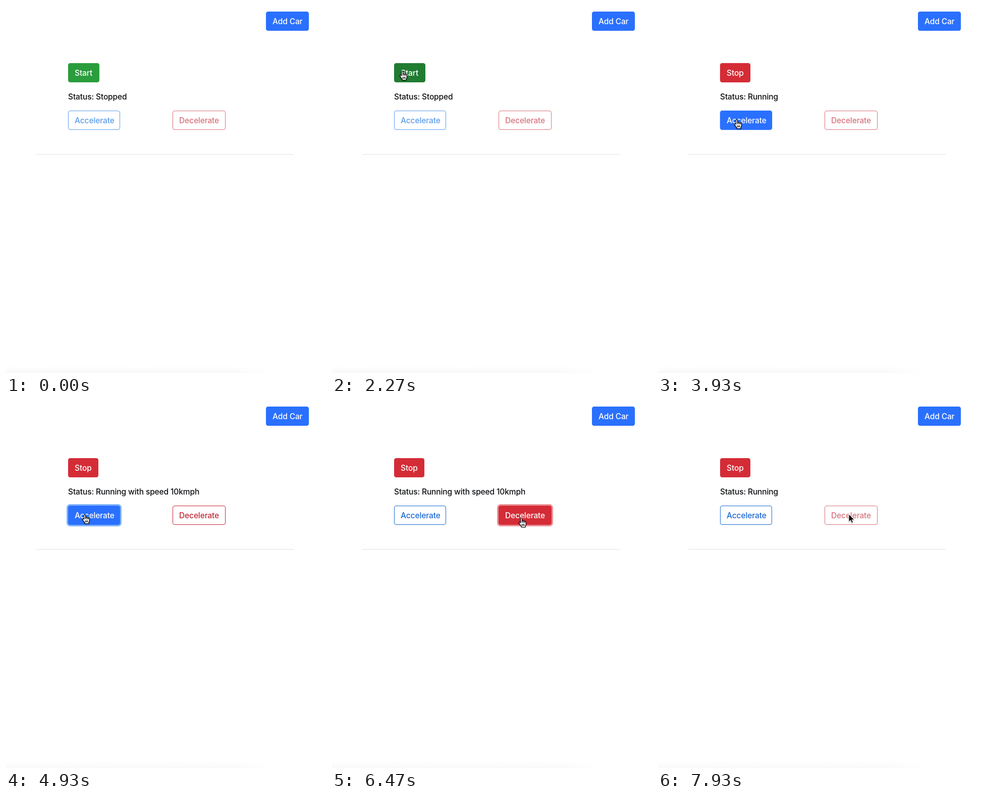
An HTML page for the animation above (8 s loop, 634 by 726 pixels).

```html
<!DOCTYPE html>
<html lang="en">
<head>
<meta charset="utf-8">
<style>
html, body { margin: 0; width: 100%; height: 100%; overflow: hidden; background: #fff; }
body { position: relative; font: 450 15.5px/24px Inter, Roboto, sans-serif; letter-spacing: -.12px; color: #0d0f12; }
body > * { position: absolute; white-space: pre; }
.btn { box-sizing: border-box; height: 38px; padding: 7px 12px 5px; border: 1px solid; border-radius: 4px; }
#add { left: 515px; top: 11px; width: 85px; color: #fff; background: #2a70fe; border-color: #2a70fe; }
#power { left: 123px; top: 113px; }
#status { left: 123px; top: 168px; }
#acc { left: 123px; top: 207px; width: 103px; }
#dec { left: 330px; top: 207px; width: 105px; }
#line { left: 60px; top: 293px; width: 510px; height: 1px; background: #e2e2e2; }
#shade { left: 0; bottom: 0; width: 530px; height: 14px; background: linear-gradient(#fff, #f9f9f9); mask: linear-gradient(90deg, #000 85%, transparent); }
svg { left: 0; top: 0; overflow: visible; filter: drop-shadow(0 1px 1px #0005); }
</style>
</head>
<body>
<div id="add" class="btn">Add Car</div>
<div id="power" class="btn"></div>
<div id="status"></div>
<div id="acc" class="btn">Accelerate</div>
<div id="dec" class="btn">Decelerate</div>
<div id="line"></div>
<div id="shade"></div>
<svg id="cursor" width="20" height="22">
  <path id="arrow" d="M0 0V15L3.5 11.8L6 17.2L8.5 16.1L6.2 10.9H11Z" fill="#000" stroke="#fff"/>
  <g id="hand" stroke="#000" stroke-width="1.2" stroke-linejoin="round" stroke-linecap="round">
    <path fill="#fff" d="M-1.4 10V2Q-1.4 .5 0 .5T1.5 2V7Q1.6 5.8 2.8 5.8T4.2 7Q4.4 6.3 5.5 6.4T6.9 7.7Q7.2 7 8.2 7.2T9.4 8.7V12Q9.4 14.4 8 16.2V18.5H.3V17Q-1.5 15.5-2.7 13L-4.5 10.4Q-5 9.2-4 8.7T-2.4 9.2Z"/>
    <path fill="none" d="M1.5 7V9.5M4.2 7.2V9.7M6.9 8V10M1.3 12.5V15.5M3.5 12.5V15.5M5.7 12.5V15.5"/>
  </g>
</svg>
<script>
const LOOP = 8000, STEP = 200 / 3, FADE = 150;
const $ = id => document.getElementById(id);

// Button looks: background, border, text, ring colour, ring width
const filled = (c, ring) => [c, c, '#fff', ring || '#fff', ring ? 3 : 0];
const outline = c => ['#fff', c, c, '#fff', 0];
const BLUE = '#2a70fe', RED = '#d42c37', RED_RING = '#ec939b', BLUE_RING = '#82b4fa';
const ready = { acc: outline('#1d69d2'), dec: outline('#c22a37') };
const off = { acc: outline('#5c9cea'), dec: outline('#d8737c') };

const looks = {
  power: [
    [0, filled('#2a9d3c')],
    [1600, filled('#207c31')],
    [2390, filled('#1c702b', '#94cd9d')],
    [2520, filled('#bf1f2b', RED_RING)],
    [3260, filled(RED, RED_RING)],
    [3825, filled(RED)]
  ],
  acc: [
    [0, off.acc],
    [2520, ready.acc],
    [3420, filled(BLUE)],
    [3885, filled(BLUE, BLUE_RING)],
    [5130, ['#9dc5f9', '#2c73df', '#69a5f5', BLUE_RING, 3]],
    [6180, ready.acc]
  ],
  dec: [
    [0, off.dec],
    [4050, ready.dec],
    [5760, filled(RED)],
    [6180, filled(RED, RED_RING)],
    [6990, ['#eca9af', '#d4505b', '#da7680', RED_RING, 3]],
    [7390, off.dec]
  ]
};
const labels = [[0, 'Start'], [2520, 'Stop']];
const states = [
  [0, 'Stopped'], [2520, 'Running'], [4050, 'Running with speed 10kmph'],
  [5130, 'Running with speed 20kmph'], [6320, 'Running with speed 10kmph'], [6990, 'Running']
];
const pointers = [
  [0, ''], [1330, 'arrow'], [1600, 'hand'], [3260, 'arrow'], [3420, 'hand'],
  [5130, 'arrow'], [5720, 'hand'], [6990, 'arrow']
];
const path = [
  [1300, 45, 160], [1730, 141, 131], [2266, 139, 128], [2600, 139, 128],
  [3000, 142, 127], [3120, 143, 128], [3520, 154, 225], [3933, 156, 224],
  [5270, 156, 224], [5733, 356, 239], [6000, 373, 232], [6466, 375, 231],
  [7060, 375, 231], [7400, 368, 243], [7600, 370, 241], [7933, 378, 224]
];

const lastIndex = (list, t) => Math.max(0, list.findLastIndex(k => k[0] <= t));
const at = (list, t) => list[lastIndex(list, t)][1];

function paint(id, t) {
  const list = looks[id], i = lastIndex(list, t);
  const to = list[i][1], from = list[Math.max(0, i - 1)][1];
  const p = Math.min(1, (t - list[i][0]) / FADE);
  const mix = n => `color-mix(in srgb, ${to[n]} ${p * 100}%, ${from[n]})`;
  const style = $(id).style;
  style.backgroundColor = mix(0);
  style.borderColor = mix(1);
  style.color = mix(2);
  style.boxShadow = `0 0 0 ${from[4] + (to[4] - from[4]) * p}px ${mix(3)}`;
}

function moveCursor(t) {
  const i = lastIndex(path, t), a = path[i], b = path[i + 1] || a;
  const p = Math.min(1, Math.max(0, (t - a[0]) / (b[0] - a[0] || 1)));
  const s = p * p * (3 - 2 * p);
  const [x, y] = [1, 2].map(n => Math.round(a[n] + (b[n] - a[n]) * s));
  $('cursor').style.transform = `translate(${x}px, ${y}px)`;
  for (const id of ['arrow', 'hand'])
    $(id).style.display = at(pointers, t) === id ? '' : 'none';
}

function draw(now) {
  const t = Math.floor((now % LOOP + 4) / STEP) * STEP % LOOP;
  $('power').textContent = at(labels, t);
  $('power').style.width = (t < 2520 ? 62 : 60) + 'px';
  $('status').textContent = 'Status: ' + at(states, t);
  Object.keys(looks).forEach(id => paint(id, t));
  moveCursor(t);
}

const start = performance.now();
function tick() {
  draw(performance.now() - start);
  requestAnimationFrame(tick);
}
tick();
</script>
</body>
</html>
```
